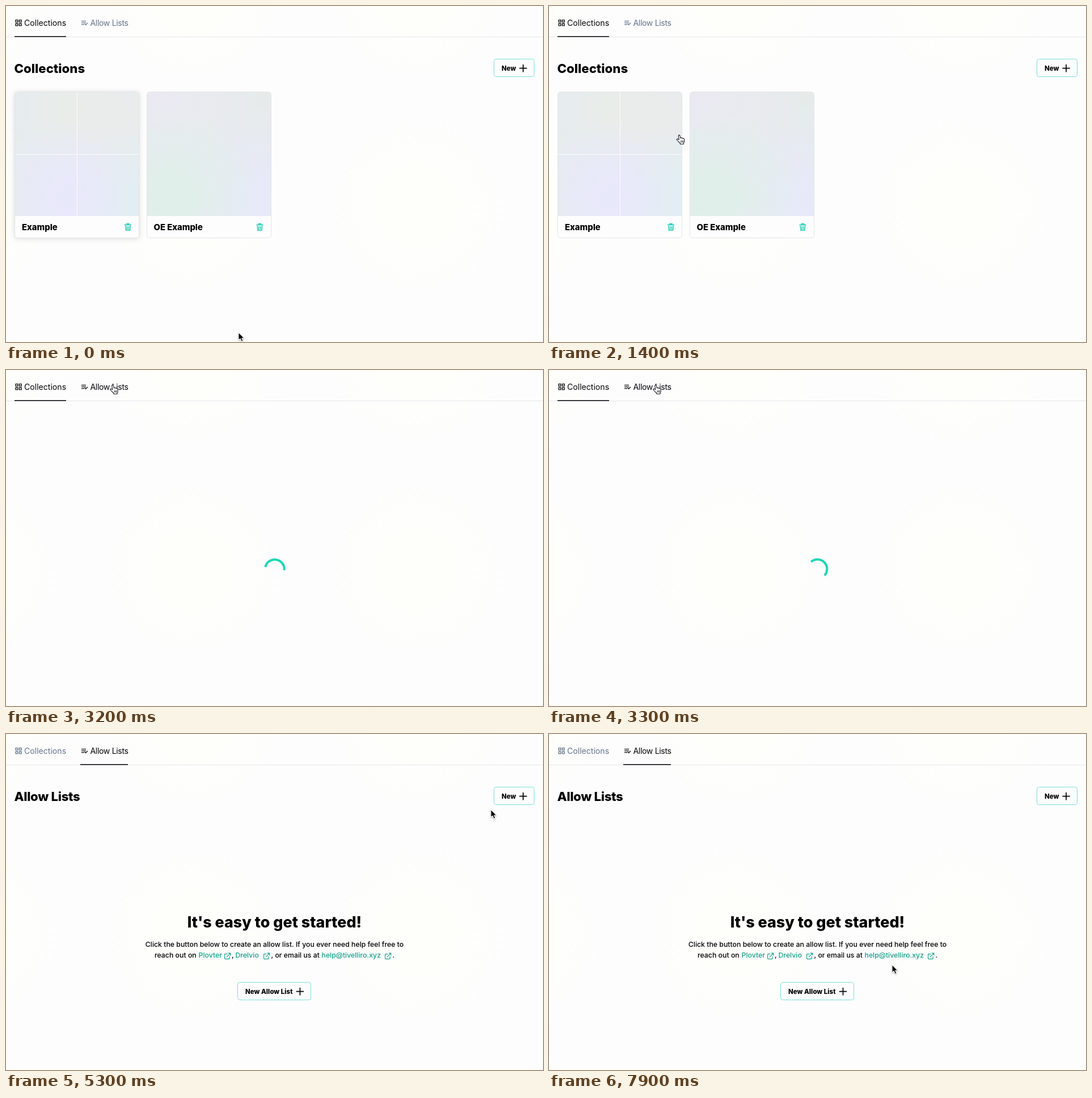
Write an HTML page that moves like this. It is 947 by 592 pixels and loops after 8000 ms.

```html
<!DOCTYPE html>
<html lang="en">
<head>
<meta charset="utf-8">
<title>Collections and allow lists</title>
<style>
  html, body { margin: 0; width: 100%; height: 100%; overflow: hidden; background: #fcfcfe; }
  #stage {
    position: relative; width: 947px; height: 592px; overflow: hidden;
    background: radial-gradient(circle closest-side, #fefefa 0, #fefefb 38%, #fdfdfe 96%) 132px 166px / 395px 375px #fdfdfe;
  }
  svg { position: absolute; inset: 0; }
  text { font-family: Inter, "Open Sans", sans-serif; white-space: pre; fill: #000; }
  .bold { font-weight: 800; }
  .tab { font-size: 14.1px; color: #64748b; }
  .tab text { fill: currentColor; }
  .tab.dark { color: #050608; }
  .line { fill: none; stroke: currentColor; }
  .card { position: absolute; top: 151px; width: 218px; height: 256px; border: 1px solid #e1e4e8; border-radius: 5px; overflow: hidden; background: #fdfdfd; }
  .art { height: 218px; }
  #first { left: 15px; }
  #first .art {
    background:
      linear-gradient(#fcfcfe, #fcfcfe) 109px 0 / 1px 100% no-repeat,
      linear-gradient(#fcfcfe, #fcfcfe) 0 109px / 100% 1px no-repeat,
      radial-gradient(circle at 42% 84%, #e8e8fb 8%, #e8e9f800 60%),
      radial-gradient(circle at 100% 88%, #e1eff3 0, #e4edf100 48%),
      radial-gradient(circle at 43% 12%, #e9ede9 0, #e9ede900 40%),
      radial-gradient(circle at 85% 18%, #ebebeb 0, #ebebeb00 55%),
      #e6ecee;
  }
  #second { left: 248px; }
  #second .art {
    background:
      radial-gradient(circle at 22% 84%, #e0efe9 8%, #e3eeeb00 62%),
      radial-gradient(circle at 92% 92%, #e7e9f9 10%, #e7e9f500 62%),
      radial-gradient(circle at 12% 0, #ebe9f2 0, #e9e9f100 60%),
      linear-gradient(75deg, #e5ecee, #e6ebea);
  }
  .button { fill: #fdfdfe; stroke: #7be0d8; }
  .link { fill: #14a08a; }
  .copy text { font-size: 12.3px; font-weight: 500; }
</style>
</head>
<body>
<div id="stage">
  <div id="cards">
    <div class="card" id="first"><div class="art"></div></div>
    <div class="card" id="second"><div class="art"></div></div>
  </div>
  <svg width="947" height="592" viewBox="0 0 947 592">
    <defs>
      <path id="plus" d="M-6 0H6M0-6V6" fill="none" stroke="#000" stroke-width="1.7" stroke-linecap="round"/>
      <g id="bin" fill="none" stroke="#2bd0b7">
        <path d="M0 3.2H12M4 3V1.2H8V3" stroke-width="1.7"/>
        <path d="M1.8 4.5 2.5 12.8H9.5L10.2 4.5M4.6 5.5V11.5M7.4 5.5V11.5" stroke-width="1.6"/>
      </g>
      <path id="out" d="M5 2.2H1.6Q.6 2.2 .6 3.2V9.8Q.6 10.8 1.6 10.8H8.2Q9.2 10.8 9.2 9.8V6.6M4.2 7.3 10.8.6M7.2.6H10.8V4.2" fill="none" stroke="#14a08a" stroke-width="1.2" stroke-linecap="round" stroke-linejoin="round"/>
    </defs>

    <path d="M0 54.5H947" stroke="#e4e6ea"/>
    <g class="tab" id="tabA">
      <path class="line" stroke-width="1.3" d="M17.1 24.6h3.7v3.7h-3.7zM23.4 24.6h3.7v3.7h-3.7zM17.1 31h3.7v3.7h-3.7zM23.4 31h3.7v3.7h-3.7z"/>
      <text x="32" y="34.5">Collections</text>
    </g>
    <g class="tab" id="tabB">
      <path class="line" stroke-width="1.3" d="M133 26.6H141M133 29.6H141M133 32.6H138M138.6 31.4 140.6 33.4 144 29.8"/>
      <text x="148.5" y="34.5" letter-spacing="-.35">Allow Lists</text>
    </g>
    <rect id="mark" y="53" height="1.6" fill="#101114"/>

    <g class="bold" id="pageA">
      <text x="14.5" y="117.5" font-size="22.2">Collections</text>
      <text x="28" y="394.5" font-size="14.8">Example</text>
      <text x="260.5" y="394.5" font-size="14.8">OE Example</text>
      <use href="#bin" x="209" y="382.5"/>
      <use href="#bin" x="441.5" y="382.5"/>
    </g>

    <g id="newButton">
      <rect class="button" x="860.5" y="93.5" width="71" height="31" rx="4"/>
      <text class="bold" x="874" y="114" font-size="11.5">New</text>
      <use href="#plus" x="912" y="109.7"/>
    </g>

    <g id="pageB">
      <text class="bold" x="14.5" y="117.5" font-size="22.2" letter-spacing="-.35">Allow Lists</text>
      <text class="bold" x="473.5" y="340.5" font-size="26.9" text-anchor="middle">It's easy to get started!</text>
      <g class="copy">
        <text x="473.5" y="375" text-anchor="middle">Click the button below to create an allow list. If you ever need help feel free to</text>
        <text x="262" y="394.3">reach out on</text>
        <text class="link" x="339.5" y="394.3">Plovter</text>
        <use href="#out" x="385" y="385.5"/>
        <text x="398" y="394.3">,</text>
        <text class="link" x="404.5" y="394.3">Drelvio</text>
        <use href="#out" x="454" y="385.5"/>
        <text x="467.5" y="394.3">, or email us at</text>
        <text class="link" x="556.5" y="394.3">help@tivelliro.xyz</text>
        <use href="#out" x="668" y="385.5"/>
        <text x="681.5" y="394.3">.</text>
      </g>
      <rect class="button" x="408.5" y="437.5" width="129" height="31" rx="4"/>
      <text class="bold" x="422" y="458" font-size="11.5">New Allow List</text>
      <use href="#plus" x="518.5" y="453.7"/>
    </g>

    <path id="spinner" d="M462 338A17 17 0 0 1 486 362" fill="none" stroke="#1bd6b5" stroke-width="4"/>

    <g id="cursor" stroke-linejoin="round">
      <path id="arrow" d="M0 0V14L3.2 11.1 5.4 16.2 8 15.1 5.8 10.2H10Z" fill="#000" stroke="#fff" stroke-width="1.1" style="filter:drop-shadow(0 1px 1px #0005)"/>
      <g id="hand" transform="translate(-5.6 -1)" stroke="#16161c" stroke-width="1.1">
        <path d="M4.8 9.6 3.9 3.1C3.7 1 6 .8 6.5 2.5L7.4 6.6C8.2 5.7 9.4 6 9.8 7 10.6 6.3 11.7 6.6 12 7.6 13 7.2 14 7.8 14.2 9L14.4 12Q14.4 14 13 15.5V17.2H7V15.8C5 14.2 3.6 12.2 1.4 10.3 0 9 1.6 7.6 3 8.4Z" fill="#fff"/>
        <path d="M8.3 11V14.5M10.2 11V14.5M12 11V14.5" stroke-width=".9"/>
      </g>
    </g>
  </svg>
</div>
<script>
  const LOOP = 8000, LOADING = 2900, LISTS = 4000;
  const $ = id => document.getElementById(id);

  // [time, values...]
  const path = [
    [0, 410, 575], [300, 406, 566], [1000, 322, 385], [1400, 230, 227],
    [1700, 211, 172], [2100, 189.5, 28], [2700, 188.5, 26], [4300, 188.5, 26],
    [5300, 855, 133], [5700, 855, 137], [6800, 808, 234], [7900, 605, 406.5], [8000, 600, 410]
  ];
  const glow = [[0, 1], [220, 0], [1410, 0], [1560, 1], [1780, 1], [1930, 0], [8000, 0]];

  const smooth = k => k * k * (3 - 2 * k);

  function sample(steps, t) {
    const i = Math.max(1, steps.findIndex(s => s[0] > t));
    const a = steps[i - 1], b = steps[i];
    const k = smooth((t - a[0]) / (b[0] - a[0]));
    return a.slice(1).map((v, n) => v + (b[n + 1] - v) * k);
  }

  const inside = (x, y, l, t, r, b) => x >= l && x <= r && y >= t && y <= b;
  const show = (id, on) => { $(id).style.display = on ? "" : "none"; };

  function draw(t) {
    const collections = t < LOADING, lists = t >= LISTS;
    const [x, y] = sample(path, t);
    const overA = inside(x, y, 15, 8, 106, 54);
    const overB = inside(x, y, 131, 8, 215, 54);
    const overCard = collections && (inside(x, y, 15, 151, 235, 409) || inside(x, y, 248, 151, 467, 409));
    const overNew = (collections || lists) && inside(x, y, 861, 94, 932, 125);
    const pointing = overA || overB || overCard || overNew;

    show("cards", collections);
    show("pageA", collections);
    show("pageB", lists);
    show("newButton", collections || lists);
    show("spinner", !collections && !lists);
    show("hand", pointing);
    show("arrow", !pointing);

    $("tabA").classList.toggle("dark", !lists || overA);
    $("tabB").classList.toggle("dark", lists || overB);
    $("mark").setAttribute("x", lists ? 131 : 15);
    $("mark").setAttribute("width", lists ? 84 : 91);

    const [g] = sample(glow, t);
    $("first").style.boxShadow = `0 1px 10px rgba(70,70,60,${0.18 * g})`;
    $("spinner").setAttribute("transform", `rotate(${(t - 3300) * 0.36} 474 350)`);
    $("cursor").setAttribute("transform", `translate(${x} ${y})`);
  }

  const start = performance.now();
  function tick() {
    draw((performance.now() - start) % LOOP);
    requestAnimationFrame(tick);
  }
  tick();
</script>
</body>
</html>
```
